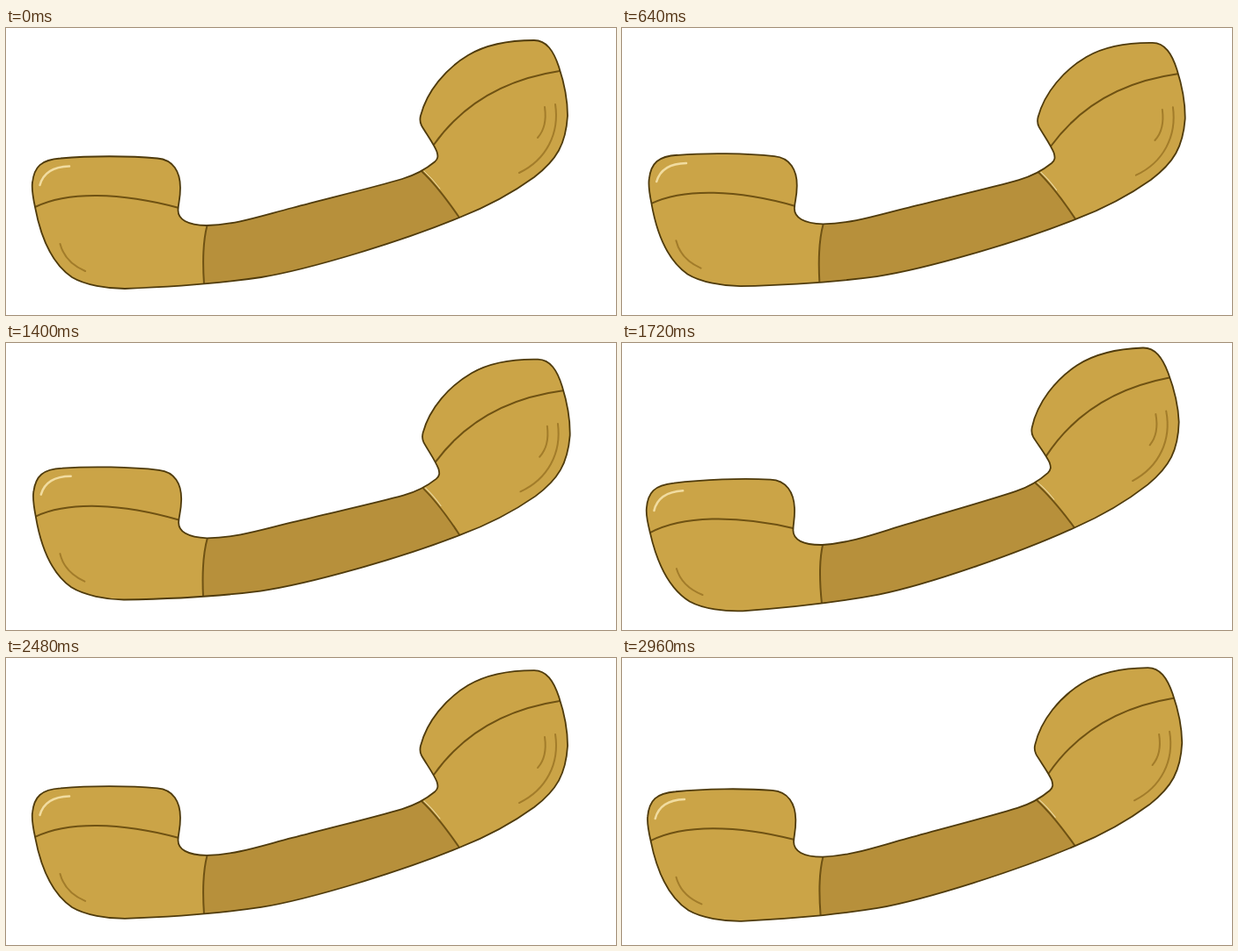
These frames come from a looping animation (693x327 px, 3000 ms). An HTML page:

```html
<!DOCTYPE html>
<html lang="en">
<head>
<meta charset="utf-8">
<title>Ringing handset</title>
<style>
  html, body { margin: 0; width: 100%; height: 100%; overflow: hidden; background: #fff; }
  svg { display: block; width: 693px; height: 327px; }
  #handset { fill: none; stroke-linecap: round; stroke-linejoin: round; }
  .seam { stroke: #6f5213; stroke-width: 2; }
  .shade { stroke: #a27c2a; stroke-width: 2; }
</style>
</head>
<body>
<svg viewBox="0 0 693 327">
  <defs>
    <path id="shape" d="M33 204C30 190 29 183 30 176C32 158 40 150 62 148.5C95 145.5 140 145.5 172 148.5
      C190 150 198 164 198 182C198 195 196 198 195.5 207C195 218 206 224.5 228 225C262 224 290 214 325 205
      C370 193 420 181 450 172C465 167.5 478 160 487 152.5C491 149 491 146 489.5 141C486 132 477 120 472 111
      C470 107 470 104 471 100C478 72 500 46 525 31C545 19 570 14 600 14C614 14 622 26 628 44
      C634 62 638 80 638 100C636 132 626 150 600 170C578 186 548 203 515 216C450 243 345 275 290 284
      C240 291.5 190 295 135 297C115 297 90 293 75 284C50 267 39 236 33 204Z"/>
    <clipPath id="inside"><use href="#shape"/></clipPath>
  </defs>
  <g id="handset">
    <use href="#shape" fill="#cba447"/>
    <g clip-path="url(#inside)">
      <path fill="#b7903b" d="M228.5 225C224 242 223.5 270 225 292L230 310L530 230L515 216C502 197 488 178 472 163L440 160Z"/>
      <path d="M475 163Q484 171 493 183" stroke="#ead9a4"/>
      <path class="seam" d="M228.5 225C224 242 223.5 270 225 292"/>
      <path class="seam" d="M515 216C502 197 488 178 472 163"/>
      <path class="seam" d="M33 204C70 186 130 187 196.5 205"/>
      <path class="seam" d="M486 133C520 85 570 58 629 49"/>
    </g>
    <path d="M38.5 179C42 166 52 158 72 157.5" stroke="#f1dca0" stroke-width="2.5"/>
    <path class="shade" d="M61.5 246C65 260 74 270 90 277"/>
    <path class="shade" d="M624 87C629 120 614 150 583 165"/>
    <path class="shade" d="M612 90C614 104 612 116 604 125"/>
    <use href="#shape" stroke="#4f3b0c" stroke-width="1.8"/>
  </g>
</svg>
<script>
  const LOOP = 3000, STEP = 40, SWING = 450, ANGLE = 3;
  const PIVOT = '364 240';
  const stops = [0, 1, 0, -1, 0];
  const handset = document.getElementById('handset');

  const ease = p => p < 0.5 ? (2 * p) ** 2.5 / 2 : 1 - (2 - 2 * p) ** 2.5 / 2;

  // Each swing rests briefly at the centre and at both ends.
  function angleAt(ms) {
    const phase = ms / SWING % 1 * 4;
    const i = Math.floor(phase);
    return ANGLE * (stops[i] + (stops[i + 1] - stops[i]) * ease(phase - i));
  }

  const start = performance.now();
  function draw() {
    const t = Math.max(0, performance.now() - start) % LOOP;
    // Poses sit on 30 fps ticks and are shown every 40 ms.
    const tick = Math.round(Math.floor(t / STEP) * STEP * 0.03);
    handset.setAttribute('transform', `rotate(${angleAt(tick / 0.03)} ${PIVOT})`);
    requestAnimationFrame(draw);
  }
  draw();
</script>
</body>
</html>
```
